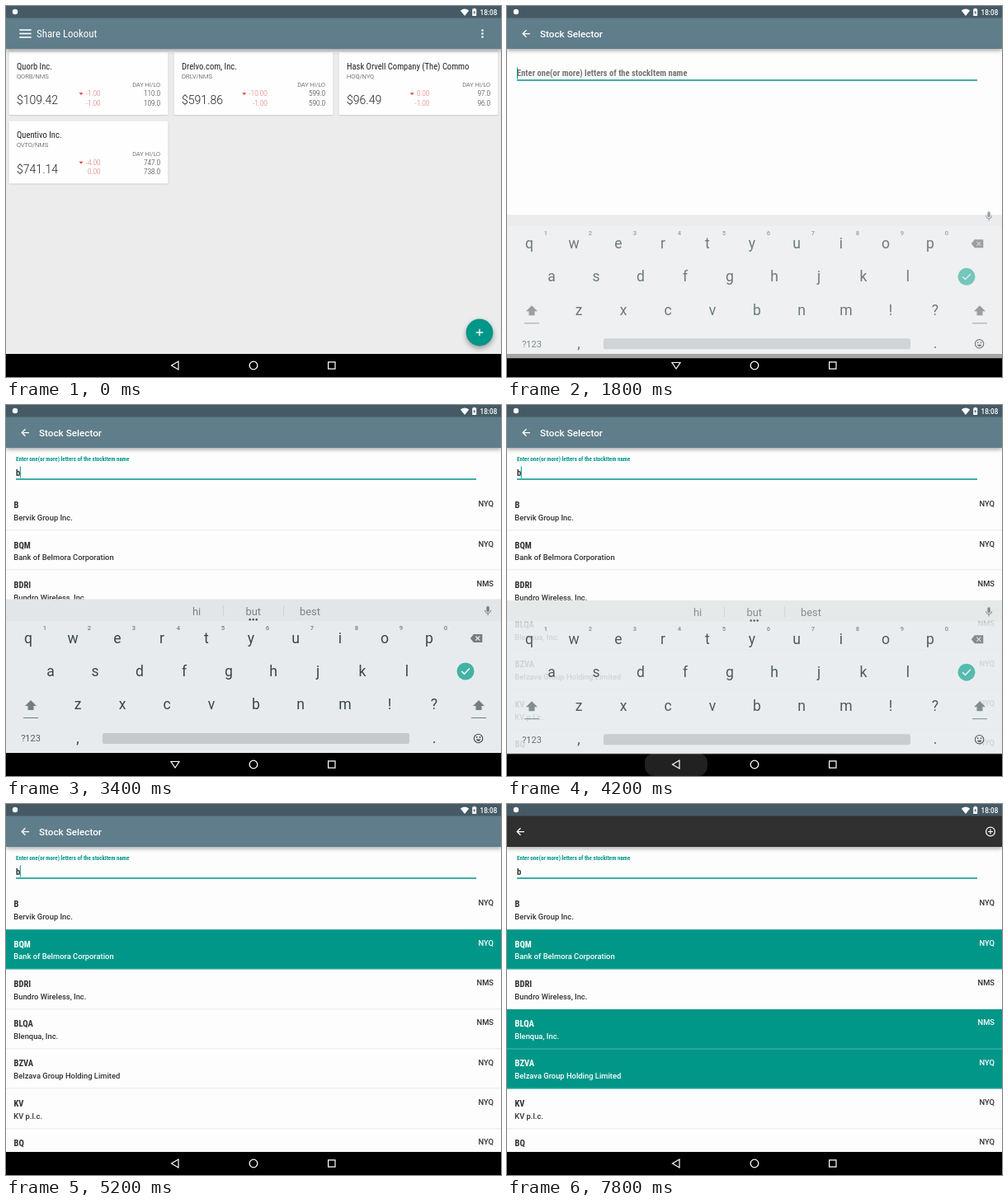
These frames come from a looping animation (600 by 450 pixels, 8000 ms). An HTML page with a canvas:

```html
<!DOCTYPE html>
<html lang="en">
<head>
<meta charset="utf-8">
<title>Share Lookout</title>
<style>
html, body { margin: 0; width: 100%; height: 100%; overflow: hidden; background: #000; }
canvas { display: block; }
</style>
</head>
<body>
<canvas id="stage" width="600" height="450"></canvas>
<script>
const ctx = document.getElementById('stage').getContext('2d');
const LOOP = 8000, STEP = 200;
const TEAL = '#009688', RED = '#e57373', INK = '#37474f', KEY = '#747e82';
const NARROW = '"Roboto Condensed", Roboto, sans-serif';

const cards = [
  ['Quorb Inc.', 'QORB/NMS', '$109.42', '-1.00', '-1.00', '110.0', '109.0'],
  ['Drelvo.com, Inc.', 'DRLV/NMS', '$591.86', '-10.00', '-1.00', '599.0', '590.0'],
  ['Hask Orvell Company (The) Commo', 'HOQ/NYQ', '$96.49', '0.00', '-1.00', '97.0', '96.0'],
  ['Quentivo Inc.', 'QVTO/NMS', '$741.14', '-4.00', '0.00', '747.0', '738.0']
];
// symbol, name, exchange, time of selection
const stocks = [
  ['B', 'Bervik Group Inc.', 'NYQ'],
  ['BQM', 'Bank of Belmora Corporation', 'NYQ', 5200],
  ['BDRI', 'Bundro Wireless, Inc.', 'NMS'],
  ['BLQA', 'Blenqua, Inc.', 'NMS', 6800],
  ['BZVA', 'Belzava Group Holding Limited', 'NYQ', 7200],
  ['KV', 'KV p.l.c.', 'NYQ'],
  ['BQ', '', 'NYQ']
];

function rect(x, y, w, h, color, radius = 0) {
  ctx.fillStyle = color;
  ctx.beginPath();
  ctx.roundRect(x, y, w, h, radius);
  ctx.fill();
}
function disc(x, y, r, color) {
  ctx.fillStyle = color;
  ctx.beginPath();
  ctx.arc(x, y, r, 0, 7);
  ctx.fill();
}
function ring(x, y, r, color, width = 1.1) {
  ctx.strokeStyle = color;
  ctx.lineWidth = width;
  ctx.beginPath();
  ctx.arc(x, y, r, 0, 7);
  ctx.stroke();
}
function fillPath(d, x, y, color) {
  ctx.save();
  ctx.translate(x, y);
  ctx.fillStyle = color;
  ctx.fill(new Path2D(d));
  ctx.restore();
}
function strokePath(d, x, y, color, width = 1.2) {
  ctx.save();
  ctx.translate(x, y);
  ctx.strokeStyle = color;
  ctx.lineWidth = width;
  ctx.stroke(new Path2D(d));
  ctx.restore();
}
function text(str, x, y, size, color, { weight = 400, narrow = false, align = 'left' } = {}) {
  ctx.font = narrow ? `${weight} condensed ${size}px ${NARROW}` : `${weight} ${size}px Roboto, sans-serif`;
  ctx.textAlign = align;
  ctx.fillStyle = color;
  ctx.fillText(str, x, y);
  return ctx.measureText(str).width;
}
function shadowed(blur, offset, alpha, draw) {
  ctx.save();
  ctx.shadowColor = `rgba(0,0,0,${alpha})`;
  ctx.shadowBlur = blur;
  ctx.shadowOffsetY = offset;
  draw();
  ctx.restore();
}
function withAlpha(alpha, dy, draw) {
  if (alpha <= 0) return;
  ctx.save();
  ctx.globalAlpha = alpha;
  ctx.translate(0, dy);
  draw();
  ctx.restore();
}

const appBar = color => shadowed(5, 2, 0.35, () => rect(0, 14, 600, 38, color));
const backArrow = x => strokePath('M4.5 0H-4M0 -4.3L-4.3 0L0 4.3', x, 33.5, '#fff', 1.25);

function statusBar() {
  rect(0, 0, 600, 14.5, '#455a64');
  disc(11, 7, 3.2, '#fff');
  fillPath('M0 4.5L-5.2 -2Q0 -5.8 5.2 -2Z', 556, 7.5, '#fff');
  rect(565.2, 3.6, 5, 8.4, '#fff', 0.5);
  rect(566.6, 2.7, 2.2, 1, '#fff');
  fillPath('M.4 -2.6L-1.4 .5H-.2L-.4 2.6L1.4 -.5H.2Z', 567.7, 7.8, '#455a64');
  text('18:08', 574.5, 10.6, 8.2, '#fff', { weight: 500 });
}

function navBar(keyboardOpen, press) {
  rect(0, 422, 600, 28, '#000');
  if (press) rect(167, 422, 76, 28, `rgba(255,255,255,${press})`, 12);
  strokePath(keyboardOpen ? 'M-5 -3.5H5L0 4Z' : 'M4 -5V5L-4.5 0Z', 205, 436, '#fff');
  ring(300, 436, 4.8, '#fff', 1.3);
  strokePath('M-4.2 -4.2H4.2V4.2H-4.2Z', 394.8, 436, '#fff');
}

function card([name, symbol, price, change, percent, high, low], i) {
  const x = 3.5 + 200 * (i % 3), y = 56 + 83.5 * Math.floor(i / 3);
  const right = { weight: 300, align: 'right' };
  shadowed(2, 0.6, 0.2, () => rect(x, y, 193, 76, '#fefefe', 1));
  text(name, x + 9.5, y + 20.6, 10.55, '#212121', { narrow: true });
  text(symbol, x + 9.5, y + 31.8, 7.5, '#333', { weight: 300 });
  text(price, x + 9.5, y + 63, 14.06, '#222', { weight: 300 });
  ctx.font = '300 8.2px Roboto, sans-serif';
  const width = ctx.measureText(change).width, edge = x + 98 + (width + 8) / 2;
  fillPath('M-2.5 -1.3H2.5L0 1.5Z', edge - width - 5.5, y + 50.5, '#e53935');
  text(change, edge, y + 53.4, 8.2, RED, right);
  text(percent, edge, y + 64.6, 8.2, RED, right);
  text('DAY HI/LO', x + 183.5, y + 42.2, 7.3, '#333', right);
  text(high, x + 183.5, y + 53.4, 8.2, '#333', right);
  text(low, x + 183.5, y + 64.6, 8.2, '#333', right);
}

function tracker() {
  rect(0, 0, 600, 450, '#ececed');
  cards.forEach(card);
  appBar('#607d8b');
  for (const y of [28.3, 32.7, 37.1]) rect(16.3, y, 14.4, 1.6, '#fff');
  text('Share Lookout', 37, 38.4, 12.9, '#fff', { narrow: true });
  for (const y of [29.5, 33.5, 37.5]) disc(577.5, y, 1.25, '#fff');
  shadowed(6, 3, 0.35, () => disc(574, 396, 16.4, TEAL));
  strokePath('M-4.2 0H4.2M0 -4.2V4.2', 574, 396, '#fff', 1.3);
}

function stockRow([symbol, name, exchange, selectAt = Infinity], i, t) {
  const y = 104 + 48.3 * i, selected = t >= selectAt;
  const color = selected ? '#fff' : '#303030';
  if (selected) rect(0, y, 600, 48.3, TEAL);
  rect(0, Math.round(y + 48) - 0.5, 600, 0.8, selected ? '#4db6ac' : '#e4e4e4');
  text(symbol, 9.5, y + 21.2, 10.55, color, { weight: 700, narrow: true });
  text(name, 9.3, y + 36, 9.375, color, { weight: 500 });
  text(exchange, 591, y + 19.3, 9.375, color, { weight: 500, align: 'right' });
}

function selector(t) {
  const typed = t >= 3000;
  const float = t < 2000 ? 0 : t < 2200 ? 0.6 : 1;
  const action = t < 5400 ? 0 : t < 5600 ? 0.5 : 1;
  rect(0, 0, 600, 450, '#fdfdfd');
  if (t >= 3200) stocks.forEach((stock, i) => stockRow(stock, i, t));
  text('Enter one(or more) letters of the stockItem name', 12, 85 - 17 * float, 10.55 - 3.52 * float,
    float ? TEAL : '#757575', { weight: 700, narrow: true });
  if (typed) text('b', 12, 86, 10.55, '#303030', { weight: 700, narrow: true });
  if (action < 1) rect(typed ? 16.8 : 12, 74.5, 1, 14, TEAL);
  rect(12, 89.3, 558, 1.4, TEAL);

  appBar('#607d8b');
  backArrow(23.5);
  text('Stock Selector', 40, 38.2, 11.72, '#fff', { weight: 500 });
  withAlpha(action, 0, () => {
    rect(0, 14, 600, 38, '#303030');
    backArrow(16.5);
    ring(586, 33.5, 5.4, '#fff', 1.2);
    strokePath('M-3 0H3M0 -3V3', 586, 33.5, '#fff');
  });
}

function keyboard(t) {
  const center = { align: 'center' };
  const top = t < 2000 ? 248 : 235.5;
  rect(0, top, 600, 262 - top, '#e3e6e8');
  rect(0, 262, 600, 160, '#e8ebed');

  if (t >= 2200) {
    const words = t < 3000 ? ['the', 'I', 'hi'] : ['hi', 'but', 'best'];
    words.forEach((word, i) => text(word, 231 + 68.7 * i, 255, 12.9, '#7b8386', center));
    for (const x of [263, 336]) rect(x, 243, 0.8, 13, '#cbd0d2');
    for (const x of [295.7, 299.7, 303.7]) disc(x, 260.3, 1.2, INK);
  }
  rect(582.4, 244, 3.4, 7, KEY, 1.7);
  strokePath('M-3.6 -1Q-3.4 2.8 0 2.8T3.6 -1M0 2.8V5.4', 584.1, 249.8, KEY, 1);

  [['qwertyuiop', 27], ['asdfghjkl', 54], ['zxcvbnm!?', 87]].forEach(([keys, left], row) =>
    [...keys].forEach((key, i) => text(key, left + 54 * i, 288.6 + 40.4 * row, 17.58, INK, center)));
  [...'1234567890'].forEach((digit, i) => text(digit, 47 + 54 * i, 273, 7.6, KEY, { weight: 500, align: 'center' }));

  fillPath('M-7.5 0L-3.5 -5H7V5H-3.5Z', 570.3, 283, KEY);
  strokePath('M-1 -2.5L4 2.5M4 -2.5L-1 2.5', 570.3, 283, '#e8ebed');
  disc(557, 323, 10.5, '#42b3a6');
  strokePath('M-4.8 0L-1.5 3.3L5 -3.4', 557, 323, '#fff', 1.4);
  for (const x of [30, 573]) {
    fillPath('M0 -6.5L7 .5H3.5V5.5H-3.5V.5H-7Z', x, 364.5, KEY);
    rect(x - 9, 379, 18, 1, KEY);
  }
  text('?123', 30, 408.3, 11, '#556066', center);
  text(',', 87, 409.5, 17.58, INK, center);
  text('.', 519, 409.5, 17.58, INK, center);
  rect(117, 398, 372, 13, '#c5c9cb', 2);
  ring(572.6, 404.5, 5.2, INK);
  disc(570.7, 403, 0.9, INK);
  disc(574.5, 403, 0.9, INK);
  fillPath('M-3 1H3Q0 5.4 -3 1Z', 572.6, 404.5, INK);
}

// opacity and downward offset of the sliding keyboard
function keyboardPose(t) {
  if (t < 1800 || t >= 4600) return [0, 0];
  if (t < 2000) return [0.7, 5.3];
  if (t < 4200) return [1, 0];
  return t < 4400 ? [0.88, 1.2] : [0.3, 8];
}

function draw(t) {
  if (t < 1600) tracker();
  if (t >= 1400) withAlpha(t < 1600 ? 0.5 : 1, 0, () => selector(t));
  statusBar();
  const press = t < 3800 || t >= 4600 ? 0 : t < 4400 ? 0.13 : 0.06;
  navBar(t >= 1800 && t < 4200, press);
  withAlpha(...keyboardPose(t), () => keyboard(t));
}

function frame(now) {
  draw(Math.floor(now % LOOP / STEP) * STEP);
  requestAnimationFrame(frame);
}
requestAnimationFrame(frame);
</script>
</body>
</html>
```
